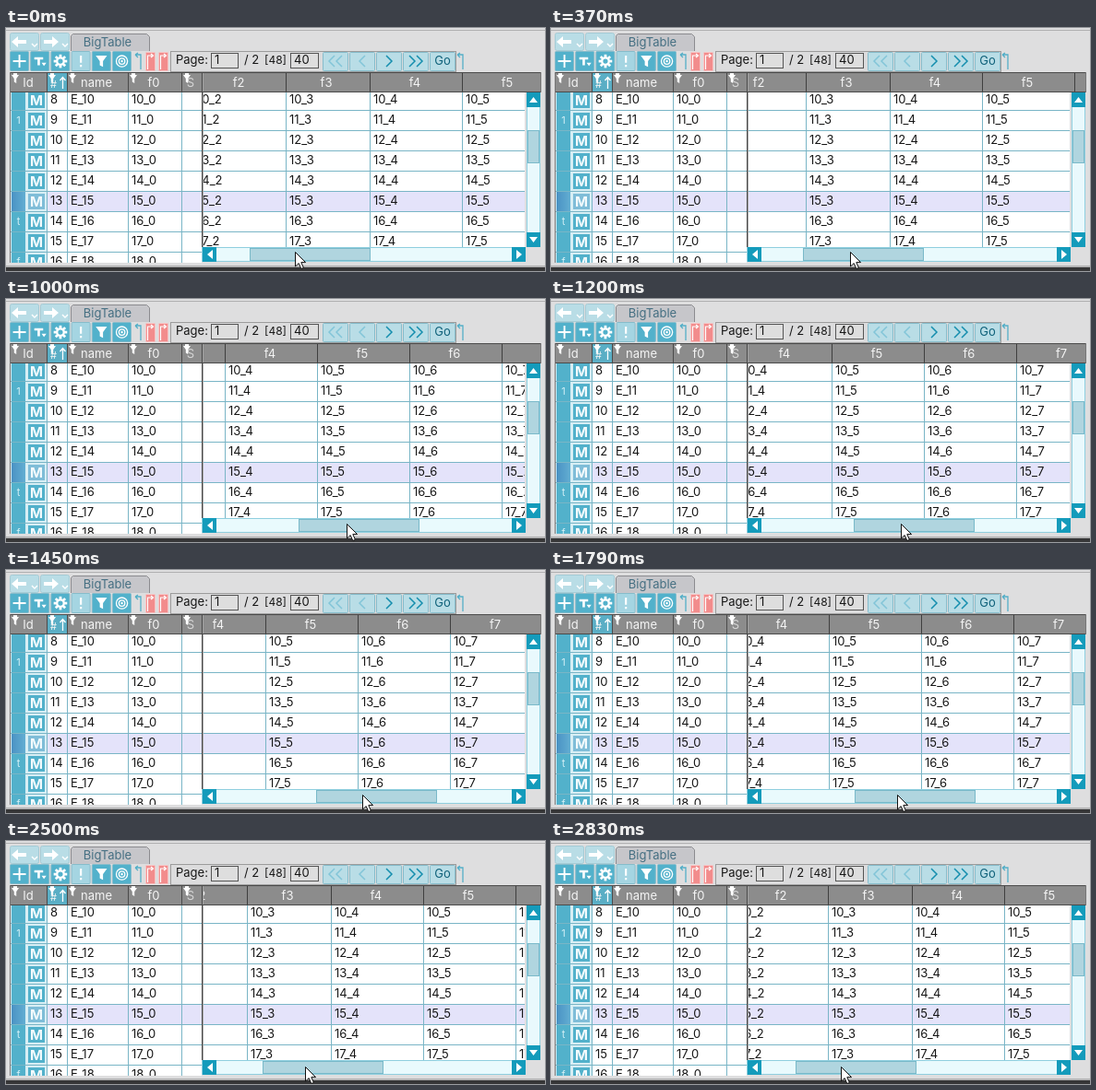
Write an HTML page that moves like this. It is 584 px wide and 264 px high and loops after 2950 ms.

```html
<!DOCTYPE html>
<html lang="en">
<head>
<meta charset="utf-8">
<title>Table scrolling</title>
<style>
html, body { margin: 0; width: 100%; height: 100%; overflow: hidden; background: #dededf; }
svg { display: block; width: 584px; height: 264px; }
text { font: 13px Inter, "Open Sans", sans-serif; fill: #161616; white-space: pre; }
.head { fill: #f4f4f4; }
</style>
</head>
<body>
<svg id="stage" viewBox="0 0 584 264"></svg>
<script>
const BACK = '#dededf', TEAL = '#52b1cb', DEEP = '#149bbb', PALE = '#b9dde6', GRID = '#79b5c6', GREY = '#8c8c8c';
const LOOP = 2950, LAST = 2830;

const rect = (x, y, w, h, fill, more = '') =>
  `<rect x="${x}" y="${y}" width="${w}" height="${h}" fill="${fill}" ${more}/>`;
const box = (x, y, w, h, fill, stroke, r = 0) =>
  rect(x + .5, y + .5, w - 1, h - 1, fill, `stroke="${stroke}" rx="${r}"`);
const path = (d, fill, more = '') => `<path d="${d}" fill="${fill}" ${more}/>`;
const line = (d, stroke, w = 1) => path(d, 'none', `stroke="${stroke}" stroke-width="${w}"`);
const text = (x, y, s, more = '') => `<text x="${x}" y="${y}" ${more}>${s}</text>`;
const mid = 'text-anchor="middle"';
const at = (x, y, s) => `<g transform="translate(${x} ${y})">${s}</g>`;
const rows = f => Array.from({ length: 9 }, (_, i) => f(i, 67 + 22 * i)).join('');

function tabs() {
  const step = (x, d) => box(x, 5, 32, 20, PALE, '#a5cbd5', 2) +
    at(x, 15, path(d, '#fff') + line('M24 2L27 5L30 2', '#fff', 1.4));
  return step(4, 'M2 0L9 -6V-2H18V2H9V6Z') + step(37, 'M20 0L13 -6V-2H4V2H13V6Z') +
    path('M70.5 25V8.5L72.5 6.5H152.5L155.5 9.5V25', '#c6c6ca', 'stroke="#8b8b8f"') +
    text(110, 20, 'BigTable', mid + ' style="fill:#456f82"');
}

function tools() {
  const hook = line('M1 2H7V6M7 5V18M1 2L4 0M1 2L4 5', '#53aec7', 1.3);
  const teeth = Array.from({ length: 8 }, (_, i) =>
    `<rect x="9.4" y="2.6" width="3.2" height="4" fill="#fff" transform="rotate(${i * 45} 11 11)"/>`).join('');
  const icons = [
    line('M11 3V19M3 11H19', '#fff', 2.2),
    path('M4 6H15V9H11V16H8V9H4ZM13 13h6l-3 4z', '#fff'),
    teeth + '<circle cx="11" cy="11" r="4.3" fill="none" stroke="#fff" stroke-width="2.6"/>',
    line('M11 4V13M11 15.5V18', '#fff', 2.4),
    path('M4 4H18L13 11V18L9 16V11Z', '#fff'),
    '<g fill="none" stroke="#fff" stroke-width="1.5"><circle cx="11" cy="11" r="7"/><circle cx="11" cy="11" r="3.7"/></g><circle cx="11" cy="11" r="1.4" fill="#fff"/>'
  ];
  const slot = box(0, 0, 11, 21, '#f28c8c', '#f8c4c4', 1) + line('M2.5 19V4H8M6 2L8.5 4L6 6', '#fff', 1.2);
  const field = (x, s, w) => box(x, 27, w, 17, '#dedede', '#555') + text(x + 4, 39, s);
  const nav = (x, w, d, dim) => box(x, 26, w, 21, PALE, '#86bccb', 1) +
    at(x + w / 2, 36, line(d, dim ? '#83c5d8' : '#168eae', 1.5));
  return icons.map((icon, i) => at(4 + 22.2 * i, 25,
      box(0, 0, 21, 22, i === 3 ? '#a5d5e2' : TEAL, '#86bccb', 1) +
      `<g transform="translate(1 1.5) scale(.87)">${icon}</g>`)).join('') +
    at(139, 27, hook) + at(151, 26, slot) + at(165, 26, slot) +
    box(178, 25, 310, 23, '#dcdcdd', '#9b9b9b') +
    text(184, 39, 'Page:') + field(222, '1', 30) + text(258, 39, '/ 2') +
    text(280, 39, '[48]', 'style="font-size:12px"') + field(308, '40', 31) +
    nav(343, 28, 'M-1 -6L-7 0L-1 6M7 -6L1 0L7 6', true) + nav(372, 28, 'M3 -6L-3 0L3 6', true) +
    nav(401, 28, 'M-3 -6L3 0L-3 6') + nav(430, 28, 'M-7 -6L-1 0L-7 6M1 -6L7 0L1 6') +
    box(459, 26, 28, 21, PALE, '#86bccb', 1) + text(473, 40, 'Go', mid + ' style="fill:#0f617a"') +
    at(488, 27, hook);
}

function frozen() {
  const pin = path('M1 2H9L6.2 6V11L3.8 9.5V6ZM3 0H7V2H3Z', '#fff');
  const marks = { 1: '1', 6: 't', 8: 'f' };
  const heads = rect(4, 48, 208, 22, GREY) + rect(45, 49, 21, 20, '#5aaec5') +
    line('M44.5 48V70M66.5 48V70M132.5 48V70M190.5 48V70', '#4a4a4a') +
    text(24, 64, 'Id', 'class="head" ' + mid) + text(98, 64, 'name', 'class="head" ' + mid) +
    text(160, 64, 'f0', 'class="head" ' + mid) + text(200, 64, 'S', 'class="head" opacity=".7"' + mid) +
    [5, 45, 67, 133, 191].map(x => at(x, 49, pin)).join('') +
    text(48, 65, '#', 'class="head" style="font-size:11px"') + line('M61.5 66V54M58.5 57L61.5 53.5L64.5 57', '#fff', 1.3);
  const cells = rows((i, y) => {
    const on = i === 5;
    return rect(4, y + 1, 208, 21, on ? '#e4e3fa' : '#fff') +
      rect(4, y + 1, 40, 21, '#d7eef4') + rect(6, y + 1, 15, 21, on ? 'url(#pick)' : TEAL) +
      rect(24, y + 3, 18, 17, on ? '#7fbdd8' : TEAL) +
      text(13.5, y + 15, marks[i] || '', mid + ' style="fill:#d4f0f7;font-size:11px"') +
      text(33, y + 16.5, 'M', mid + ' style="fill:#f4fbfd;font-weight:700;font-size:15px"') +
      text(48, y + 15, i + 8) + text(70, y + 15, 'E_' + (i + 10)) + text(136, y + 15, i + 10 + '_0') +
      rect(4, y + 22, 208, 1, GRID);
  });
  return `<g clip-path="url(#sheet)">${cells}${line('M44.5 70V255M66.5 70V255M132.5 70V255M190.5 70V255', GRID)}</g>` +
    heads;
}

function columns() {
  let head = '', body = '';
  for (let c = 2; c <= 8; c++) {
    const x = c < 4 ? [204, 304][c - 2] : 395 + 100 * (c - 4);
    head += rect(x - 1, 49, 1, 21, '#3f3f3f') + text(x + (c === 3 ? 43 : 48), 64, 'f' + c, 'class="head" ' + mid);
    body += rect(x - 1, 70, 1, 170, GRID) + rows((i, y) => text(x + 3, y + 15, `${i + 10}_${c}`));
  }
  return [head, body];
}

function bars() {
  const button = (x, y, d) => at(x, y, rect(0, 0, 15, 16, DEEP) + path(d, '#fff'));
  const thumb = (x, y, w, h) => box(x, y, w, h, '#b0d5df', '#79b9c9');
  return rect(562, 70, 18, 185, BACK) + box(564, 70, 15, 168, '#e9f9fd', '#8fcfdf') +
    thumb(565, 111, 13, 36) +
    button(564, 70, 'M3 11L7.5 5L12 11Z') + button(564, 222, 'M3 5L7.5 11L12 5Z') +
    box(212, 238, 351, 16, '#e9fafd', '#8fcfdf') + rect(212, 254, 351, 1, BACK) +
    `<g id="thumb">${thumb(264, 239, 131, 14)}</g>` +
    button(213, 238, 'M11 3L5 8L11 13Z') + button(548, 238, 'M5 3L11 8L5 13Z');
}

const [head, body] = columns();
const stage = document.getElementById('stage');
stage.innerHTML = `<defs>
  <linearGradient id="pick"><stop offset="0" stop-color="#4a92c4"/><stop offset="1" stop-color="#62aed2"/></linearGradient>
  <clipPath id="sheet"><rect x="4" y="70" width="208" height="185"/></clipPath>
  <clipPath id="view"><rect x="213" y="70" width="349" height="168"/></clipPath>
  <clipPath id="top"><rect x="213" y="48" width="366" height="22"/></clipPath></defs>` +
  rect(0, 0, 584, 264, BACK) + rect(0, 2, 584, 1, '#b0b0b1') +
  tabs() + tools() + frozen() +
  rect(212, 48, 368, 22, GREY) + `<g clip-path="url(#top)"><g class="scroll">${head}</g></g>` +
  rect(212, 70, 350, 168, '#fff') + rect(212, 178, 350, 21, '#e4e3fa') +
  rows((i, y) => i < 8 ? rect(212, y + 22, 350, 1, GRID) : '') +
  `<g clip-path="url(#view)"><g class="scroll">${body}</g></g>` +
  rect(212, 48, 1, 207, '#484848') + rect(213, 48, 1, 190, '#a4a4a4') + bars() +
  line('M4 48.5H580M4 69.5H580', '#4a4a4a') + line('M4.5 48V255M579.5 48V70', '#777') +
  rect(0, 258, 584, 2, '#b4b4b5') + rect(0, 260, 584, 4, '#363637') +
  `<g id="mouse">${path('M.5 .5V16L4.2 12.6L6.8 18.6L9.4 17.4L6.8 11.6H11.6Z', '#fff', 'stroke="#111" stroke-linejoin="round"')}</g>`;

// Drag distance in pixels: time, distance, speed
const drag = [[0, 0, .006], [700, 29, .079], [1000, 53, .069], [1450, 72, .016],
  [1510, 72.6, 0], [2080, 45, -.08], [2500, 14, -.06], [2830, 1, -.012], [2950, 0, 0]];

function dragAt(t) {
  const i = Math.max(1, drag.findIndex(p => p[0] >= t));
  const [t0, a, va] = drag[i - 1], [t1, b, vb] = drag[i];
  const d = t1 - t0, u = (t - t0) / d, w = 1 - u;
  return a * w * w * (1 + 2 * u) + b * u * u * (3 - 2 * u) + d * u * w * (va * w - vb * u);
}

const scrolls = document.querySelectorAll('.scroll');
const thumb = document.getElementById('thumb'), mouse = document.getElementById('mouse');
const move = (el, x, y = 0) => el.setAttribute('transform', `translate(${x} ${y})`);

// Six pictures per quarter second, then a short hold
function tick(t) {
  const beat = Math.floor(t / 250) * 250 + Math.min(5, Math.floor(t % 250 / 40)) * 40;
  return Math.min(LAST, beat);
}

function draw() {
  const t = tick(performance.now() % LOOP);
  const pull = Math.round(dragAt(t));
  scrolls.forEach(el => move(el, -Math.round(pull * 2.965)));
  move(thumb, pull);
  // The pointer runs about one picture ahead of the table
  move(mouse, 313 + Math.round(dragAt(Math.min(LAST, t + 48))), 243 + Math.round(t / 1400));
  requestAnimationFrame(draw);
}
draw();
</script>
</body>
</html>
```
